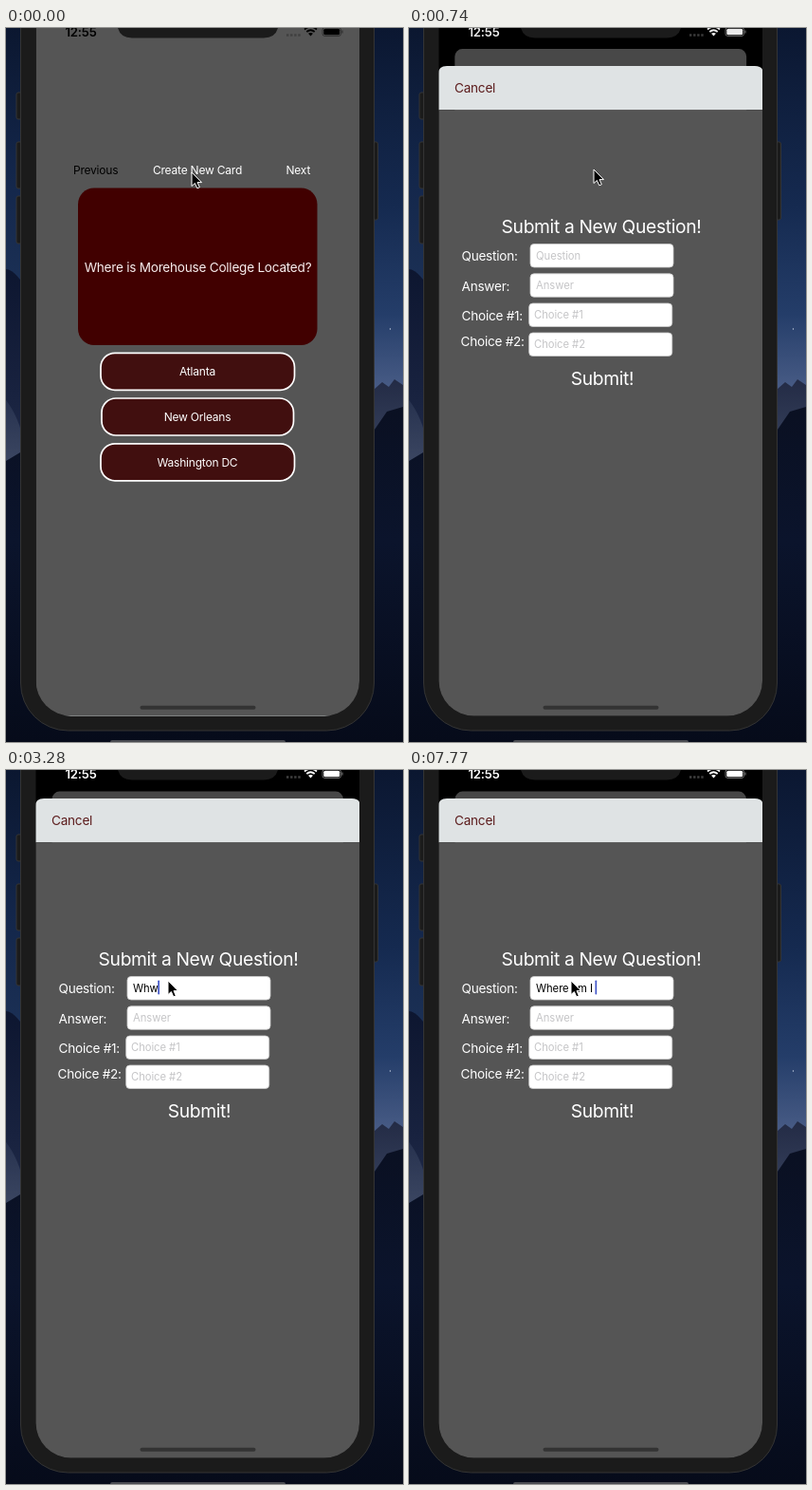
Recreate the animation shown at these times as an HTML page. Size 419 by 752 pixels, loop 8 s.

```html
<!DOCTYPE html>
<html lang="en">
<head>
<meta charset="utf-8">
<title>Flashcards</title>
<style>
  html, body { margin: 0; width: 100%; height: 100%; overflow: hidden; background: #070c1c; }
  svg { display: block; width: 419px; height: 752px; }
  text { font-family: Inter, "Open Sans", sans-serif; font-size: 13.6px; letter-spacing: -.018em; fill: #fff; white-space: pre; }
  .mid { text-anchor: middle; }
  .small { font-size: 12px; }
  .title { font-size: 19.26px; }
  .input { font-size: 11.25px; letter-spacing: -.005em; fill: #c5c5c7; }
  .option { fill: #410f0f; stroke: #fff; stroke-width: 1.7; }
  .field { fill: #fff; stroke: #cdcdcd; stroke-width: .8; }
  .body { fill: #1b1b1b; stroke: #343434; }
</style>
</head>
<body>
<svg viewBox="0 0 419 752">
  <defs>
    <linearGradient id="skyL" x2="0" y2="1">
      <stop offset="0" stop-color="#0b1730"/><stop offset=".2" stop-color="#13264a"/><stop offset=".36" stop-color="#1b3055"/>
    </linearGradient>
    <linearGradient id="hillL" x2="0" y2="1">
      <stop offset="0" stop-color="#0d1630"/><stop offset=".6" stop-color="#18223f"/><stop offset="1" stop-color="#232d4b"/>
    </linearGradient>
    <linearGradient id="mist" x2="0" y2="1">
      <stop offset="0" stop-color="#27324f"/><stop offset="1" stop-color="#3f4a65"/>
    </linearGradient>
    <linearGradient id="skyR" x2="0" y2="1">
      <stop offset="0" stop-color="#0b1731"/><stop offset=".25" stop-color="#152a50"/><stop offset=".4" stop-color="#243d69"/><stop offset=".5" stop-color="#465a84"/>
    </linearGradient>
    <linearGradient id="ridge" x2="0" y2="1">
      <stop offset="0" stop-color="#232b45"/><stop offset="1" stop-color="#38435f"/>
    </linearGradient>
    <linearGradient id="ground" x2="0" y2="1">
      <stop offset="0" stop-color="#0a1022"/><stop offset=".4" stop-color="#0b142c"/><stop offset="1" stop-color="#060b1a"/>
    </linearGradient>
    <clipPath id="screen"><rect x="31.5" y="-60" width="341.5" height="784.5" rx="37"/></clipPath>
  </defs>

  <!-- wallpaper -->
  <rect width="210" height="752" fill="url(#skyL)"/>
  <rect x="210" width="209" height="752" fill="url(#skyR)"/>
  <path d="M0 254Q8 254 20 272V470H0Z" fill="url(#hillL)"/>
  <path d="M0 392Q14 410 20 440V470H0Z" fill="url(#mist)"/>
  <path d="M380 388L397 373 404 378 410 370 419 376V450H380Z" fill="url(#ridge)"/>
  <path d="M0 456L20 444 380 436 402 404 419 399V752H0Z" fill="url(#ground)"/>
  <circle cx="405.500" cy="317" r=".7" fill="#c8d2e6"/>
  <rect x="110" y="750" width="185" height="4" rx="2" fill="#4a4c52"/>

  <!-- phone -->
  <g class="body">
    <rect x="11" y="68" width="8" height="28" rx="2"/>
    <rect x="11" y="120" width="8" height="49" rx="2"/>
    <rect x="11" y="177" width="8" height="50" rx="2"/>
    <rect x="384" y="120" width="8.500" height="82" rx="2"/>
    <rect x="15.500" y="-80" width="373" height="820" rx="50"/>
  </g>

  <g clip-path="url(#screen)">
    <rect x="31" y="-60" width="343" height="785"/>
    <g id="home">
      <rect id="page" x="31.500" y="-15" width="341.500" height="739.500" fill="#555"/>
      <text class="small" x="71" y="154" style="fill:#000">Previous</text>
      <text class="small mid" id="create" x="202" y="154">Create New Card</text>
      <text class="small" x="295.500" y="154">Next</text>
      <rect x="76" y="168.500" width="252.500" height="165.500" rx="17" fill="#410000"/>
      <text class="mid" x="202.500" y="257" style="fill:#f8eeee">Where is Morehouse College Located?</text>
      <rect class="option" x="100" y="342.300" width="204.500" height="39" rx="15"/>
      <rect class="option" x="101" y="390" width="202.500" height="39" rx="15"/>
      <rect class="option" x="100" y="437.800" width="204.500" height="39" rx="15"/>
      <text class="small mid" x="202" y="366">Atlanta</text>
      <text class="small mid" x="202" y="414">New Orleans</text>
      <text class="small mid" x="202" y="462">Washington DC</text>
      <rect id="dim" x="31" y="-16" width="343" height="741"/>
    </g>

    <g id="sheet">
      <path d="M31 40V8Q31 0 40 0H365Q374 0 374 8V40Z" fill="#dfe3e4"/>
      <rect x="31" y="40" width="343" height="6.300" fill="#dfe3e4"/>
      <rect x="31" y="46.300" width="343" height="720" fill="#555"/>
      <text x="48" y="28" style="fill:#5c1c1c">Cancel</text>
      <text class="title mid" x="203" y="175.500">Submit a New Question!</text>
      <text x="55.500" y="205">Question:</text>
      <text x="55.500" y="236.500">Answer:</text>
      <text x="55.500" y="268">Choice #1:</text>
      <text x="54.500" y="295">Choice #2:</text>
      <rect class="field" x="128" y="187.500" width="151" height="24.500" rx="4"/>
      <rect class="field" x="128" y="218.800" width="151" height="24.500" rx="4"/>
      <rect class="field" x="126.700" y="250" width="151" height="24.500" rx="4"/>
      <rect class="field" x="126.700" y="281" width="151" height="24.500" rx="4"/>
      <text class="input" id="entry" x="134" y="203.500"></text>
      <text class="input" x="134" y="234.700">Answer</text>
      <text class="input" x="132" y="266">Choice #1</text>
      <text class="input" x="132" y="297">Choice #2</text>
      <rect id="caret" y="191.500" width="1.700" height="15" rx=".8" fill="#4256c8"/>
      <text class="title mid" x="204" y="335.500">Submit!</text>
    </g>

    <!-- status bar -->
    <path d="M108 -6Q117 -6 118 0Q121 10.500 133 10.500H272Q284 10.500 287 0Q288 -6 297 -6Z" fill="#1b1b1b"/>
    <g id="status">
      <text class="mid" x="79" y="9.300" style="font-size:13.200px;font-weight:600;fill:inherit">12:55</text>
      <path d="M315 1.500Q321.500 -4 328 1.500M317.300 4Q321.500 .5 325.700 4" fill="none" stroke-width="1.800"/>
      <path d="M319 5.800Q321.500 4 324 5.800L321.500 8.500Z" stroke="none"/>
      <rect x="334" y="-.5" width="19.500" height="9" rx="2.500" fill="none" stroke-width=".8" opacity=".5"/>
      <rect x="335.300" y=".8" width="16.900" height="6.400" rx="1.500" stroke="none"/>
      <rect x="354.500" y="2.500" width="1" height="3" stroke="none" opacity=".5"/>
      <path d="M296 7.500H311" fill="none" stroke-width="2.400" stroke-dasharray="2.400 1.700" opacity=".25"/>
    </g>
    <rect x="141.500" y="713.800" width="122" height="4" rx="2" fill="#333"/>
  </g>

  <path id="pointer" d="M0 0V14.500L3.400 11.500 5.800 16.800 8.300 15.800 6 10.600H10.500Z" stroke="#fff" stroke-width="1" stroke-linejoin="round"/>
</svg>
<script>
const LOOP = 8000, OFF = 724, REST = 30;
const el = id => document.getElementById(id);

// Each step holds until the next one and overrides only what changes.
const steps = [
  [0, { at: [196, 152], press: 1, top: OFF, ink: 0, text: "", caret: 0 }],
  [150, { at: [195, 149], press: .3 }],
  [300, { press: .2 }],
  [440, { press: .5, top: 607 }],
  [590, { top: 99.5, ink: 170 }],
  [740, { top: 40, ink: 235 }],
  [890, { top: REST, ink: 255 }],
  [1190, { at: [192, 176] }],
  [1340, { at: [174, 230] }],
  [1490, { at: [171, 222] }],
  [1930, { caret: 1 }],
  [2530, { caret: .35 }],
  [2680, { caret: 0 }],
  [2980, { caret: 1 }],
  [3130, { text: "W" }],
  [3280, { text: "Whw" }],
  [3880, { caret: .35 }],
  [4030, { text: "Wh", caret: 1 }],
  [4630, { caret: .06 }],
  [4780, { caret: 0 }],
  [5070, { caret: 1 }],
  [5220, { text: "Whr" }],
  [5820, { caret: .35 }],
  [5970, { text: "Wh", caret: 1 }],
  [6120, { text: "Whe" }],
  [6270, { text: "Wher" }],
  [6420, { text: "Where" }],
  [6570, { text: "Where " }],
  [6870, { text: "Where a" }],
  [7020, { text: "Where am" }],
  [7320, { text: "Where am " }],
  [7620, { text: "Where am I" }],
  [7770, { text: "Where am I " }]
];

function draw(t) {
  const s = Object.assign({}, ...steps.filter(([at]) => at <= t).map(([, change]) => change));
  const rise = (OFF - s.top) / (OFF - REST);
  const ink = `rgb(${s.ink},${s.ink},${s.ink})`;

  el("pointer").setAttribute("transform", `translate(${s.at})`);
  el("create").setAttribute("opacity", s.press);
  el("home").setAttribute("transform", `translate(202 361) scale(${1 - .1 * rise}) translate(-202 -361)`);
  el("page").setAttribute("rx", 9 * rise);
  el("dim").setAttribute("opacity", .16 * rise * rise);
  el("sheet").setAttribute("transform", `translate(0 ${s.top})`);
  el("status").setAttribute("fill", ink);
  el("status").setAttribute("stroke", ink);
  for (const label of el("status").querySelectorAll("text")) label.setAttribute("stroke", "none");

  const entry = el("entry");
  entry.textContent = s.text || "Question";
  entry.style.fill = s.text ? "#000" : "";
  el("caret").setAttribute("x", 133.5 + (s.text ? entry.getComputedTextLength() : 0));
  el("caret").setAttribute("opacity", s.caret);
}

const start = performance.now();
function tick() {
  draw((performance.now() - start) % LOOP);
  requestAnimationFrame(tick);
}
tick();
</script>
</body>
</html>
```
